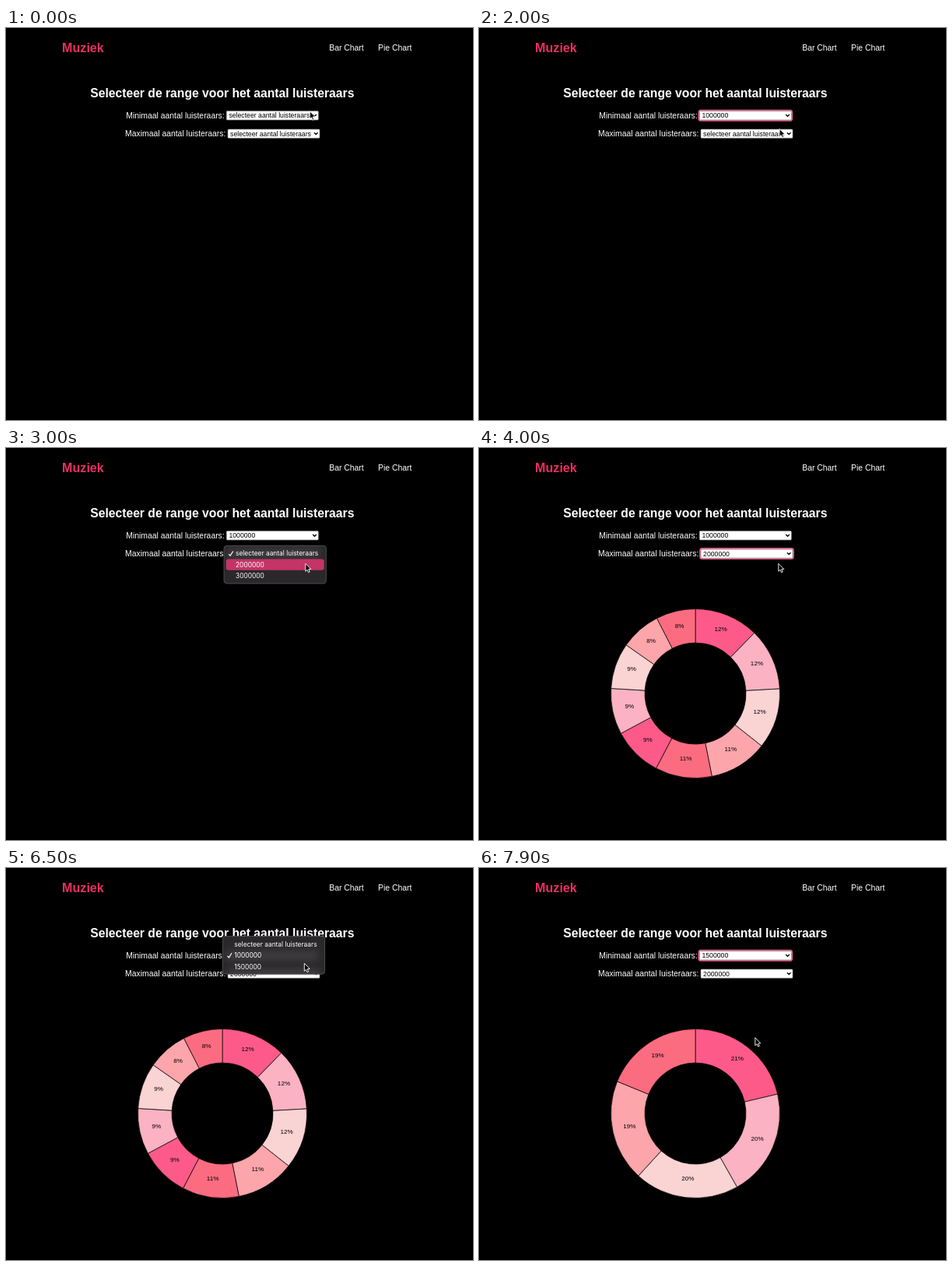
These frames come from a looping animation (600 by 503 pixels, 8000 ms). An HTML page with a canvas:

```html
<!DOCTYPE html>
<html lang="nl">
<head>
<meta charset="utf-8">
<title>Muziek</title>
<style>
html, body { margin: 0; width: 100%; height: 100%; overflow: hidden; background: #000; }
canvas { display: block; }
</style>
</head>
<body>
<canvas id="stage" width="600" height="503"></canvas>
<script>
const ctx = document.getElementById('stage').getContext('2d');
const LOOP = 8000, STEP = 100, ROW = 14.4;
const SANS = '"Liberation Sans", Arial, sans-serif';
const PLACEHOLDER = 'selecteer aantal luisteraars';
const COLORS = ['#fd5a89', '#fbb2c2', '#fad3d3', '#fca5ab', '#fc6c80'];

// Listeners per artist, in millions
const LISTENERS = [1.78, 1.71, 1.67, 1.62, 1.57, 1.37, 1.27, 1.27, 1.12, 1.09];

const SELECTS = [
  { x: 283, y: 106.3, label: 'Minimaal', options: [PLACEHOLDER, 1000000, 1500000] },
  { x: 284.7, y: 129.6, label: 'Maximaal', options: [PLACEHOLDER, 2000000, 3000000] }
];

// A menu opens on a select, an option is clicked and chosen
const PICKS = [
  { select: 0, open: 700, click: 1400, choice: 1 },
  { select: 1, open: 2200, click: 2900, choice: 1 },
  { select: 0, open: 5400, click: 6500, choice: 2 }
];
const FADE = 200, CLOSE = 300;

// Pointer moves: start, duration, destination
const HOME = { x: 390, y: 106.5 };
const MOVES = [
  [100, 100, 387.5, 108],
  [900, 300, 386.6, 125.3],
  [1900, 200, 385, 133],
  [2300, 300, 384.5, 148],
  [4700, 400, 384, 108],
  [5800, 400, 383, 122],
  [7300, 500, 354.5, 217.5]
];

const ease = p => p * p * (3 - 2 * p);
const clamp = p => Math.min(1, Math.max(0, p));

function pointerAt(t) {
  return MOVES.reduce((pos, [start, span, x, y]) => {
    const p = ease(clamp((t - start) / span));
    return { x: pos.x + (x - pos.x) * p, y: pos.y + (y - pos.y) * p };
  }, HOME);
}

// Index of the option a select holds at time t
function chosen(select, t) {
  const done = PICKS.filter(p => p.select === select && p.click + FADE <= t);
  return done.length ? done.pop().choice : 0;
}

function text(s, x, y, font, color = '#fff', align = 'left') {
  ctx.font = font;
  ctx.fillStyle = color;
  ctx.textAlign = align;
  ctx.fillText(s, x, y);
}

function box(x, y, w, h, r, fill, stroke, line = 0.7) {
  ctx.beginPath();
  ctx.roundRect(x, y, w, h, r);
  if (fill) { ctx.fillStyle = fill; ctx.fill(); }
  if (stroke) { ctx.strokeStyle = stroke; ctx.lineWidth = line; ctx.stroke(); }
}

function polyline(points, color, width) {
  ctx.beginPath();
  points.forEach(p => ctx.lineTo(...p));
  ctx.strokeStyle = color;
  ctx.lineWidth = width;
  ctx.stroke();
}

function drawSelect({ x, y, label, options }, choice, focused) {
  text(label + ' aantal luisteraars:', x - 2.3, y + 9.2, '10.4px ' + SANS, '#fff', 'right');
  if (focused) box(x - 0.5, y - 0.5, 119.6, 12.9, 2.5, null, '#ee5f93', 2);
  box(x + 0.3, y + 0.3, 118, 11.4, 1, '#fff', '#858585');
  text(options[choice], x + 3.4, y + 9.1, '8.7px ' + SANS, '#000');
  polyline([[x + 111.2, y + 4.6], [x + 113.5, y + 7], [x + 115.8, y + 4.6]], '#000', 1.4);
}

function drawPie(min, max) {
  const cx = 278, cy = 315, outer = 108.5, inner = 65, mid = (outer + inner) / 2;
  const data = LISTENERS.filter(v => v * 1e6 >= min && v * 1e6 <= max);
  const total = data.reduce((a, b) => a + b);
  let a = -Math.PI / 2;
  data.forEach((v, i) => {
    const share = v / total, b = a + share * 2 * Math.PI, m = (a + b) / 2;
    ctx.beginPath();
    ctx.arc(cx, cy, outer, a, b);
    ctx.arc(cx, cy, inner, b, a, true);
    ctx.closePath();
    ctx.fillStyle = COLORS[i % COLORS.length];
    ctx.fill();
    ctx.strokeStyle = '#000';
    ctx.lineWidth = 0.7;
    ctx.stroke();
    text(Math.round(share * 100) + '%', cx + mid * Math.cos(m), cy + mid * Math.sin(m),
      '8.1px ' + SANS, '#000', 'center');
    a = b;
  });
}

function drawMenu({ select, open, click }, t, pointer) {
  if (t < open || t >= click + CLOSE) return;
  const { x: sx, y: sy, options } = SELECTS[select];
  const checked = chosen(select, open);
  const x = sx - 5, y = sy - 4.7 - checked * ROW;
  ctx.save();
  if (t >= click + FADE) ctx.globalAlpha = 0.5;
  box(x, y, 132, 49.4, 4, '#2a282a');

  // Soft glow of the selects behind the panel
  ctx.save();
  ctx.clip();
  ctx.filter = 'blur(5px)';
  SELECTS.forEach(s => box(s.x, s.y, 118, 12, 0, 'rgba(255,255,255,.1)'));
  ctx.restore();
  box(x + 0.4, y + 0.4, 131.2, 48.6, 4, null, '#5c5a5c');

  // The hovered row blinks once when clicked
  const row = Math.floor((pointer.y - y - 3.2) / ROW);
  if (t < click || t >= click + STEP) box(x + 3, y + 3.2 + row * ROW, 126, 14.3, 3, '#c43467');

  options.forEach((s, i) => text(s, x + 15.3, y + 13.5 + i * ROW, '8.4px Inter, sans-serif'));
  const cy = y + 10.6 + checked * ROW;
  polyline([[x + 6.5, cy + 0.6], [x + 8.4, cy + 2.8], [x + 12, cy - 3]], '#fff', 1.2);
  ctx.restore();
}

function drawPointer({ x, y }) {
  ctx.save();
  ctx.translate(x, y);
  ctx.fillStyle = '#000';
  ctx.strokeStyle = '#fff';
  ctx.lineWidth = 0.9;
  const arrow = new Path2D('M.3 .3V10.3L2.5 8.3 4 11.7 5.7 11 4.2 7.6 7.3 7.4Z');
  ctx.fill(arrow);
  ctx.stroke(arrow);
  ctx.restore();
}

function draw(t) {
  ctx.fillStyle = '#000';
  ctx.fillRect(0, 0, 600, 503);

  text('Muziek', 72.1, 31, 'bold 16.1px ' + SANS, '#ea2f62');
  text('Bar Chart', 415.2, 29, '10.4px ' + SANS);
  text('Pie Chart', 478, 29, '10.4px ' + SANS);
  text('Selecteer de range voor het aantal luisteraars', 108.2, 88.6, 'bold 15.7px ' + SANS);

  const opened = PICKS.filter(p => p.open <= t).pop();
  const choices = SELECTS.map((s, i) => chosen(i, t));
  SELECTS.forEach((s, i) => drawSelect(s, choices[i], opened && opened.select === i));
  if (choices.every(Boolean)) drawPie(...SELECTS.map((s, i) => s.options[choices[i]]));

  const pointer = pointerAt(t);
  PICKS.forEach(p => drawMenu(p, t, pointer));
  drawPointer(pointer);
}

const start = performance.now();
function tick() {
  const t = (performance.now() - start) % LOOP;
  draw(Math.floor(t / STEP) * STEP);
  requestAnimationFrame(tick);
}
tick();
</script>
</body>
</html>
```
